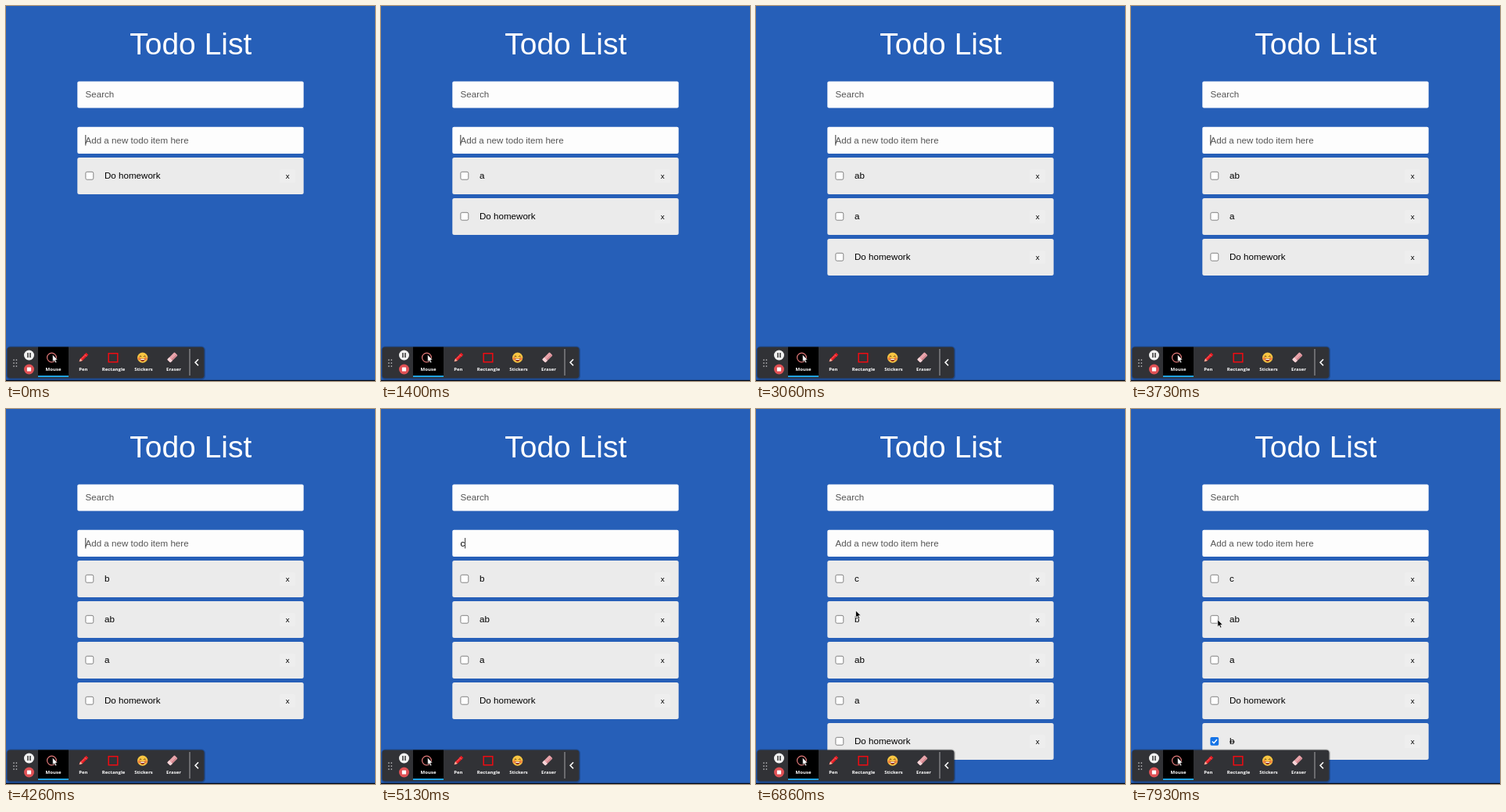
An HTML page that plays this animation: 472x480 px, repeating every 8000 ms.

```html
<!DOCTYPE html>
<html lang="en">
<head>
<meta charset="utf-8">
<title>Todo List</title>
<style>
  html, body { margin: 0; width: 100%; height: 100%; overflow: hidden; background: #265fb8; }
  svg { display: block; width: 100vw; height: 100vh; }
  text { font: 11.6px "Liberation Sans", Arial, sans-serif; white-space: pre; }
  .title { font-size: 39px; fill: #fff; text-anchor: middle; }
  .hint { fill: #555; }
  .remove { font-size: 9.8px; text-anchor: middle; }
  .label { font: 700 6px "Open Sans", sans-serif; fill: #fff; text-anchor: middle; }
</style>
</head>
<body>
<svg viewBox="0 0 472 480">
  <rect width="472" height="480" fill="#265fb8"/>
  <text class="title" x="236.3" y="62">Todo List</text>
  <g fill="#fdfdfd">
    <rect x="91.3" y="96.5" width="289.4" height="34" rx="2"/>
    <rect x="91.3" y="154.8" width="289.4" height="34.2" rx="2"/>
  </g>
  <text class="hint" x="101.5" y="117.3">Search</text>
  <text id="entry" x="101.5" y="175.6"></text>
  <rect id="caret" y="165" width="0.9" height="13.5" fill="#222"/>
  <g id="rows"></g>

  <rect y="478.8" width="472" height="1.2" fill="#05080f"/>
  <g id="toolbar">
    <rect x="0.5" y="435.5" width="254.5" height="43" rx="5" opacity="0.22"/>
    <rect x="1.5" y="436.5" width="252" height="40" rx="4" fill="#313236"/>
    <path d="M10 453h0m3.4 0h0M10 457h0m3.4 0h0M10 461h0m3.4 0h0" stroke="#c4c4c6" stroke-width="1.7" stroke-linecap="round"/>
    <circle cx="29.5" cy="447" r="6.5" fill="#f1f1f1"/>
    <path d="M28 444v6M31 444v6" stroke="#333" stroke-width="1.5"/>
    <circle cx="29.5" cy="465" r="6.5" fill="#df5054"/>
    <rect x="26.9" y="462.4" width="5.2" height="5.2" rx="0.6" fill="#fff"/>
    <rect x="41" y="436.5" width="39" height="38.5"/>
    <rect x="41" y="473" width="39" height="2" fill="#20a4e4"/>

    <circle cx="58.5" cy="450" r="5.9" fill="none" stroke="#e07878" stroke-width="1.2"/>
    <path d="M59.5 446.2l.3 9.2 2-1.7 1.5 3 1.5-.8-1.5-2.8 2.6-.3z" fill="#fff" stroke="#111" stroke-width="0.6"/>

    <g transform="translate(99 450) rotate(45)">
      <path d="M-1.9-7h3.8v10.6l-1.9 4-1.9-4z" fill="#e51c23"/>
      <path d="M-1.9-4h3.8M-.5-3v6" stroke="#ff8d8d" stroke-width="0.7"/>
      <path d="M-1.9 3.6h3.8l-1.9 4z" fill="#f5b4a0"/>
    </g>
    <rect x="131.2" y="444.7" width="11.6" height="11" fill="none" stroke="#f00b12" stroke-width="1.5"/>

    <circle cx="174.7" cy="450.2" r="6.6" fill="#f9c642"/>
    <circle cx="170.6" cy="451.4" r="2" fill="#f1863e"/>
    <circle cx="178.8" cy="451.4" r="2" fill="#f1863e"/>
    <path d="M170.7 448.8q1.3-1.8 2.6 0M176.1 448.8q1.3-1.8 2.6 0" fill="none" stroke="#5a3210" stroke-width="0.9"/>
    <path d="M171.6 451.6h6.2q-.5 3.5-3.1 3.5t-3.1-3.5z" fill="#8d2c20"/>
    <path d="M172 451.7h5.4l-.5 1.2h-4.4z" fill="#fff"/>

    <g transform="translate(212.7 450) rotate(45)">
      <rect x="-2.9" y="-6.8" width="5.8" height="13.2" rx="1" fill="#e9a3aa"/>
      <path d="M-2.9 2.6h5.8v2.8a1 1 0 0 1-1 1h-3.8a1 1 0 0 1-1-1z" fill="#f7d5d8"/>
      <path d="M1.6-6v8.3" stroke="#c97b85" stroke-width="1.2"/>
    </g>
    <path d="M235 439v34" stroke="#b4b4b6" stroke-width="0.9"/>
    <path d="M246 452.3l-3.9 4 3.9 4" fill="none" stroke="#fff" stroke-width="1.6"/>
  </g>
  <path id="beam" d="M-2-5q2 0 2 1.3q0-1.3 2-1.3M0-3.7v8M-2 5q2 0 2-1.3q0 1.3 2 1.3M-1.2 1.5h2.4" fill="none" stroke="#222" stroke-width="0.9"/>
  <path id="arrow" d="M0 0v9.2l2.1-1.9 1.5 3.3 1.6-.7-1.5-3.2h2.9z" stroke="#fff" stroke-width="0.7"/>
</svg>
<script>
const LOOP = 8000;
const byId = id => document.getElementById(id);

// Each step: time, text being typed, items from top to bottom.
const steps = [
  [0, "", ["Do homework"]],
  [1400, "", ["a", "Do homework"]],
  [2260, "a", ["a", "Do homework"]],
  [2600, "ab", ["a", "Do homework"]],
  [2930, "", ["ab", "a", "Do homework"]],
  [3800, "b", ["ab", "a", "Do homework"]],
  [4130, "", ["b", "ab", "a", "Do homework"]],
  [5000, "c", ["b", "ab", "a", "Do homework"]],
  [5330, "", ["c", "b", "ab", "a", "Do homework"]],
  [7530, "", ["c", "ab", "a", "Do homework", "b"], "b"]
];

// Pointer stops: time, x, y.
const pointerPath = [
  [5930, 211.5, 186], [6260, 176, 224], [6460, 176, 224], [7060, 110.8, 269.6], [LOOP, 110.8, 269.6]
];

const tools = { Mouse: 60.5, Pen: 98.8, Rectangle: 137.5, Stickers: 176, Eraser: 214.5 };
byId("toolbar").innerHTML += Object.entries(tools)
  .map(([name, x]) => `<text class="label" x="${x}" y="467">${name}</text>`).join("");

function rowMarkup(name, index, done) {
  const box = done
    ? `<rect x="101.4" y="211.9" width="10.8" height="10.8" rx="1.8" fill="#1473e6"/>
       <path d="M103.8 217.4l2.2 2.3 4-4.8" fill="none" stroke="#fff" stroke-width="1.5"/>`
    : `<rect x="101.9" y="212.3" width="9.9" height="9.9" rx="1.8" fill="#fff" stroke="#777" stroke-width="0.9"/>`;
  const strike = done ? `<path d="M126 218h6.5" stroke="#000" stroke-width="0.9"/>` : "";
  return `<g transform="translate(0 ${index * 52})">
    <rect x="91.3" y="194" width="289.4" height="47" rx="2.5" fill="#ebebeb"/>
    <rect x="350" y="209" width="20" height="17" rx="1.5" fill="#eee"/>
    ${box}<text x="126" y="221.3">${name}</text>${strike}
    <text class="remove" x="360.2" y="220.6">x</text></g>`;
}

let shown;
function showStep(step) {
  if (step === shown) return;
  shown = step;
  const [, typed, items, done] = step;
  const entry = byId("entry");
  entry.textContent = typed || "Add a new todo item here";
  entry.setAttribute("class", typed ? "" : "hint");
  byId("caret").setAttribute("x", 101.4 + (typed ? entry.getComputedTextLength() : 0));
  byId("rows").innerHTML = items.map((name, i) => rowMarkup(name, i, name === done)).join("");
}

function place(id, visible, x, y) {
  byId(id).setAttribute("visibility", visible ? "visible" : "hidden");
  byId(id).setAttribute("transform", `translate(${x} ${y})`);
}

function showPointer(time) {
  const active = time >= pointerPath[0][0];
  const next = Math.max(1, pointerPath.findIndex(stop => stop[0] > time));
  const [t0, x0, y0] = pointerPath[next - 1];
  const [t1, x1, y1] = pointerPath[next];
  const p = Math.min(1, Math.max(0, (time - t0) / (t1 - t0)));
  const eased = p * p * (3 - 2 * p);
  const x = x0 + (x1 - x0) * eased;
  const y = y0 + (y1 - y0) * eased;
  const overInput = y < 189;
  place("beam", active && overInput, x, y);
  place("arrow", active && !overInput, x, y);
  byId("caret").setAttribute("visibility", active ? "hidden" : "visible");
}

const start = performance.now();
function draw(now) {
  const time = Math.max(0, now - start) % LOOP;
  showStep(steps.findLast(step => step[0] <= time));
  showPointer(time);
  requestAnimationFrame(draw);
}
draw(start);
</script>
</body>
</html>
```
